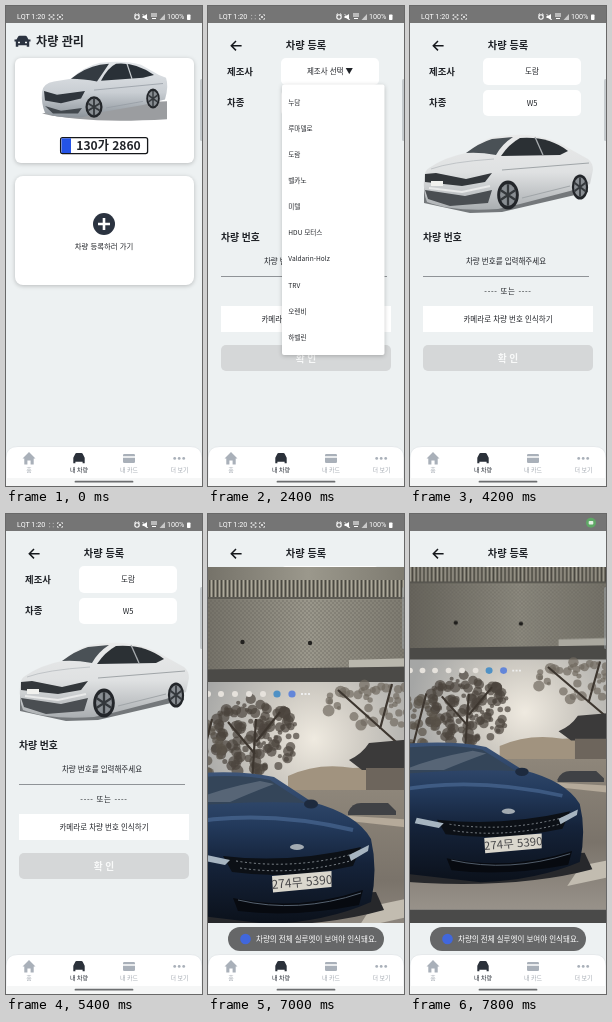
An HTML page that plays this animation: 196 px wide and 480 px high, repeating every 8 s.

```html
<!DOCTYPE html>
<html lang="ko">
<head>
<meta charset="utf-8">
<title>차량 등록</title>
<style>
html, body { margin: 0; width: 100%; height: 100%; overflow: hidden; background: #edf1f2; }
svg { display: block; width: 100vw; height: 100vh; }
text { font-family: "Noto Sans CJK KR", "Noto Sans CJK", sans-serif; fill: #202328; }
.mid { text-anchor: middle; }
.bold { font-weight: 700; }
.t75 { font-size: 7.5px; }
.status text { font-family: Roboto, sans-serif; fill: #fff; font-size: 7.2px; }
.menu text { font-size: 6.6px; }
.tabs text { font-size: 6px; fill: #a3a9b1; text-anchor: middle; }
.tabs .active { fill: #1f252e; font-weight: 500; }
.card { filter: drop-shadow(0 1.5px 2px rgba(0, 0, 0, .22)); }
.soft { filter: blur(.7px); }

.step { animation: 8s step-end infinite; }
.home { animation-name: home; }
.press { animation-name: press; }
.maker-menu { animation-name: makerMenu; }
.model-menu { animation-name: modelMenu; }
.no-maker { animation-name: noMaker; }
.maker { animation-name: maker; }
.no-model { animation-name: noModel; }
.model { animation-name: model; }
.camera { animation-name: camera; }
.toast { animation-name: toast; }
.live { animation-name: live; }
.status { animation-name: statusOut; }
.chip { animation-name: chip; }
.blink { animation: blink 1s step-end infinite; }
.view { animation: pan 8s infinite; }
.shade { animation: shade 8s infinite; }
@keyframes home { 0% { opacity: 1 } 5% { opacity: 0 } }
@keyframes press { 0% { opacity: 1 } 2.5% { opacity: .5 } }
@keyframes makerMenu { 0% { opacity: 0 } 20% { opacity: 1 } 32.5% { opacity: 0 } }
@keyframes modelMenu { 0% { opacity: 0 } 40% { opacity: 1 } 52.5% { opacity: 0 } }
@keyframes noMaker { 0% { opacity: 1 } 32.5% { opacity: 0 } }
@keyframes maker { 0% { opacity: 0 } 32.5% { opacity: 1 } }
@keyframes noModel { 0% { opacity: 1 } 52.5% { opacity: 0 } }
@keyframes model { 0% { opacity: 0 } 52.5% { opacity: 1 } }
@keyframes camera { 0% { opacity: 0 } 75% { opacity: 1 } }
@keyframes toast { 0% { opacity: 0 } 77.5% { opacity: .6 } 80% { opacity: 1 } }
@keyframes live { 0% { opacity: 0 } 85% { opacity: 1 } }
@keyframes statusOut { 0% { opacity: 1 } 95% { opacity: 0 } }
@keyframes chip { 0% { opacity: 0 } 95% { opacity: 1 } }
@keyframes blink { 0% { opacity: 1 } 40% { opacity: 0 } 80% { opacity: 1 } }
@keyframes pan {
  0%, 87.5% { transform: translate(0, 0) scale(1, 1); animation-timing-function: steps(4, end) }
  97.5%, 100% { transform: translate(12.5px, -9px) scale(.965, .92) }
}
@keyframes shade {
  0%, 87.5% { opacity: 0; animation-timing-function: steps(4, end) }
  97.5%, 100% { opacity: .08 }
}
</style>
</head>
<body>
<svg viewBox="0 0 196 480" preserveAspectRatio="none">
  <defs>
    <linearGradient id="silver" x2="0" y2="1">
      <stop stop-color="#e4e7ea"/><stop offset=".55" stop-color="#c9ced3"/><stop offset="1" stop-color="#8d949b"/>
    </linearGradient>
    <linearGradient id="pearl" x2="0" y2="1">
      <stop stop-color="#e9eaea"/><stop offset=".5" stop-color="#dfe1e2"/><stop offset="1" stop-color="#aaaeb1"/>
    </linearGradient>
    <linearGradient id="navy" x2="0" y2="1">
      <stop stop-color="#3c5478"/><stop offset=".35" stop-color="#233a5c"/><stop offset=".6" stop-color="#15233a"/><stop offset="1" stop-color="#0b111b"/>
    </linearGradient>
    <linearGradient id="monitor">
      <stop offset=".1" stop-color="#716e65"/><stop offset=".5" stop-color="#9b988c"/><stop offset=".9" stop-color="#79766c"/>
    </linearGradient>
    <radialGradient id="sky" gradientUnits="userSpaceOnUse" cx="106" cy="225" r="120">
      <stop stop-color="#efeae0"/><stop offset=".4" stop-color="#d0ccc4"/><stop offset="1" stop-color="#a5a6a5"/>
    </radialGradient>
    <linearGradient id="ground" x2="0" y2="1">
      <stop stop-color="#8e867a"/><stop offset=".55" stop-color="#7a736a"/><stop offset="1" stop-color="#98928a"/>
    </linearGradient>
    <pattern id="slats" width="4" height="17" patternUnits="userSpaceOnUse"><path d="M1.5 0V17" stroke="#4b4942" stroke-width="2"/></pattern>
    <pattern id="mesh" width="4" height="4" patternUnits="userSpaceOnUse"><path d="M0 1h2M2 3h2" stroke="#5d5b53" opacity=".6"/></pattern>
    <clipPath id="lens"><path d="M0 53H196V409H0Z"/></clipPath>
    <path id="front" d="M-6 -.5L-4 -5Q-3.6 -6 -2.5 -6H2.5Q3.6 -6 4 -5L6 -.5V5.5H3.8V4H-3.8V5.5H-6Z"/>
    <g id="focus" fill="none" stroke="#fff" stroke-width=".7"><path d="M-2.5 -1V-2.3H-1.2M1.2 -2.3H2.5V-1M2.5 1V2.3H1.2M-1.2 2.3H-2.5V1"/></g>
    <g id="wheel"><ellipse rx="9" ry="12" fill="#23262a"/><ellipse rx="6.6" ry="9.2" fill="#888d92"/><path d="M0 -9V9M-6 -4L6 4M-6 4L6 -4" stroke="#34383c" stroke-width="1.9"/></g>
  </defs>

  <path d="M0 0H196V480H0Z" fill="#edf1f2"/>

  <g id="form">
    <path d="M33.6 39.7H23.6M28 35L23.3 39.7L28 44.4" fill="none" stroke="#15181c" stroke-width="1.5"/>
    <text class="mid bold" x="98" y="43.3" font-size="10.2">차량 등록</text>
    <text class="bold" x="19" y="68.8" font-size="9.4">제조사</text>
    <text class="bold" x="19" y="100.3" font-size="9.4">차종</text>
    <rect x="73" y="52" width="98" height="27" rx="5" fill="#fff"/>
    <rect x="73" y="84" width="98" height="26" rx="5" fill="#fff"/>
    <g class="mid t75">
      <text class="step no-maker" x="122" y="68.3">제조사 선택 ▼</text>
      <text class="step maker" x="122" y="68.3">도람</text>
      <text class="step no-model" x="122" y="99.8">차종 선택 ▼</text>
      <text class="step model" x="122" y="99.8">W5</text>
      <text x="96" y="257.8">차량 번호를 입력해주세요</text>
      <text x="98" y="287.8" letter-spacing=".7">---- 또는 ----</text>
    </g>
    <g class="step model">
      <path d="M14 197L60 207L92 206L178 186V176H14Z" fill="#74787b"/>
      <path d="M14 173Q14 165 19 162Q35 151 56 147Q68 137 80 132Q98 128 118 129Q144 132 160 143L178 153Q183 157 183 164L180 178L160 185L110 198L88 203Q42 206 17 196Q13 186 14 173Z" fill="url(#pearl)"/>
      <path d="M56 147Q69 137 82 133L103 131Q92 138 86 149Q70 146 56 147Z" fill="#4a5156"/>
      <path d="M91 150Q99 138 110 132Q139 130 158 145L150 149Z" fill="#2b3034"/>
      <path d="M125 131L133 149" stroke="#a9adb0" stroke-width="1.3"/>
      <path d="M21 163Q40 156 84 153" fill="none" stroke="#c0c4c7"/>
      <path d="M15 168L26 167L56 173L82 167L75 176L52 180L15 176Z" fill="#33373b"/>
      <path d="M15 184L55 190L82 184L78 197L40 200L18 193Z" fill="#4a4e52"/>
      <path d="M19 182L52 186L80 180" fill="none" stroke="#e9eaea" stroke-width="2"/>
      <path d="M21 175H33V180H21Z" fill="#f1f1ee"/>
      <path d="M92 164L179 157M112 192L160 180" stroke="#a0a5a8"/>
      <use href="#wheel" transform="translate(98 189) scale(1.2)"/>
      <use href="#wheel" transform="translate(170 181) scale(.9 1.05)"/>
    </g>
    <text class="bold" x="13" y="234.6" font-size="9.8">차량 번호</text>
    <path d="M13 270.5H179" stroke="#85898d" stroke-width=".9"/>
    <path d="M13 300H183V326H13Z" fill="#fff"/>
    <text class="mid t75" x="98" y="315.8">카메라로 차량 번호 인식하기</text>
    <rect x="13" y="339" width="170" height="26" rx="5" fill="#d5d7d8"/>
    <text class="mid bold" x="98" y="355.7" font-size="9.7" style="fill:#f8f9f9">확 인</text>
  </g>

  <g class="step home">
    <path d="M0 17H196V441H0Z" fill="#edf1f2"/>
    <g fill="#2b3340"><use href="#front" transform="translate(16.5 35.5) scale(1.12 .95)"/><path d="M8.5 33.5H11V35.5H8.5ZM22 33.5H24.5V35.5H22Z"/></g>
    <path d="M12 36.5H14M19 36.5H21" stroke="#edf1f2" stroke-width="1.5"/>
    <text class="bold" x="30" y="39.5" font-size="12.1">차량 관리</text>
    <rect class="card" x="9" y="52" width="179" height="105" rx="6" fill="#fff"/>
    <g transform="translate(0 7) scale(1 .94)">
      <path d="M36 107Q80 118 161 113V94L80 98Z" fill="#9b9da0"/>
      <path d="M36 84Q37 75 48 73L65 70Q78 57 94 53Q119 50 135 55L153 66L160 69Q163 78 159 92L137 98L98 105L76 111Q50 112 39 106Q35 96 36 84Z" fill="url(#silver)"/>
      <path d="M65 70Q79 58 94 55L103 54L91 73Q77 70 65 70Z" fill="#343b42"/>
      <path d="M95 72Q102 58 110 54Q130 52 148 66L137 69Z" fill="#293037"/>
      <path d="M121 54L126 70" stroke="#c7ccd0" stroke-width="1.2"/>
      <path d="M38 83L51 87L79 83L75 91L55 96L39 93Z" fill="#2f353c"/>
      <path d="M39 99L55 104L76 101L72 107L47 107Z" fill="#42484e"/>
      <path d="M88 82L157 75M100 101L137 94" stroke="#959ca3" stroke-width=".8"/>
      <use href="#wheel" transform="translate(88 100) scale(.95)"/>
      <use href="#wheel" transform="translate(147 91) scale(.75 .88)"/>
    </g>
    <rect x="54.6" y="131.6" width="87" height="16" rx="2" fill="#fff" stroke="#15171a" stroke-width="1.3"/>
    <path d="M55.5 132.3H65V147H55.5Z" fill="#2453e6"/>
    <text class="mid bold" x="102.5" y="144" font-size="12.1">130가 2860</text>
    <g class="step press">
      <rect class="card" x="9" y="170" width="179" height="109" rx="8" fill="#fff"/>
      <circle cx="98" cy="218" r="11" fill="#2b3340"/>
      <path d="M92 218H104M98 212V224" stroke="#fff" stroke-width="2.6"/>
      <text class="mid" x="98" y="243" font-size="7.4">차량 등록하러 가기</text>
    </g>
  </g>

  <g class="step camera" clip-path="url(#lens)">
    <path d="M0 53H196V409H0Z"/>
    <g class="step live"><g class="view">
      <path d="M-40 20H240V168H-40Z" fill="url(#monitor)"/>
      <path d="M-40 66H240V83H-40Z" fill="#aeaa9c"/>
      <path d="M-40 66H240V83H-40Z" fill="url(#slats)"/>
      <path d="M-40 84H240" stroke="#5d5b54" stroke-width="2"/>
      <path d="M-40 86H240V156H-40Z" fill="url(#mesh)"/>
      <circle cx="34.5" cy="128" r="2.2" fill="#22211f"/><circle cx="102" cy="129" r="2.2" fill="#22211f"/>
      <path d="M141 146L240 143V152L141 154Z" fill="#b9b7ad"/>
      <path class="shade" d="M-40 20H240V168H-40Z"/>
      <path d="M-40 156L240 152V170H-40Z" fill="#4b4a47"/>
      <path d="M-40 168H240V480H-40Z" fill="url(#sky)"/>
      <g class="soft">
        <g id="trees"></g>
        <path d="M44 270L48 205M47 240L20 208M48 228L72 198M-10 262L4 205M196 235L130 176M172 215L184 170" fill="none" stroke="#3d362f" stroke-width="2.2"/>
        <path d="M80 262Q110 248 145 254L240 250V292H80Z" fill="#a1937f"/>
        <path d="M141 246Q154 240 161 229L240 222V256H154Z" fill="#3b3a3a"/>
        <path d="M158 254H240V276H158Z" fill="#6d655c"/>
        <path d="M-40 276H240V440H-40Z" fill="url(#ground)"/>
        <path d="M140 298Q144 289 153 289H180L188 297V301H140Z" fill="#3f4145"/>
        <path d="M110 300L240 308V318L150 308Z" fill="#b5aa9a"/>
        <path d="M164 392L240 376V394L150 414Z" fill="#c2bcb0"/>
        <path d="M-40 388L168 378L176 396Q90 420 -40 408Z" fill="#27282b"/>
        <path d="M-40 262Q25 254 66 263L104 288Q149 300 163 325Q170 355 163 388Q118 408 60 410L-40 398Z" fill="url(#navy)"/>
        <path d="M-40 266Q28 258 62 266L97 289Q42 286 -40 294Z" fill="#344559"/>
        <path d="M-20 288Q10 275 52 267L66 270Q40 280 22 288Z" fill="#6e7c8b" opacity=".6"/>
        <ellipse cx="103" cy="290" rx="7" ry="4.5" fill="#1d2a3e"/>
        <path d="M-30 311Q50 294 145 316" fill="none" stroke="#587ba8" stroke-width="4" opacity=".5"/>
        <path d="M15 342Q82 350 153 333L145 352Q82 366 24 358Z" fill="#0c1016"/>
        <path d="M28 347Q85 356 145 340M32 354Q85 362 142 347" fill="none" stroke="#858c92" stroke-dasharray="2 2.5"/>
        <path d="M-6 340L22 346L17 351L-8 346ZM141 341L161 331L160 337L143 347Z" fill="#a7b5c1"/>
        <path d="M25 384Q90 398 155 376L151 391Q86 404 30 397Z" fill="#070a10"/>
        <path d="M30 386Q90 400 153 379" fill="none" stroke="#55616f"/>
        <ellipse cx="89" cy="333" rx="7" ry="3" fill="#a3abb2"/>
        <path d="M-40 440H240V480H-40Z" fill="#4a4a49"/>
      </g>
      <path d="M64 362L123.5 357V373L65 378.5Z" fill="#dad7cd"/>
      <text class="mid" x="94" y="372.3" font-size="12" transform="rotate(-5 94 368)" style="fill:#48484a">274무 5390</text>
      <g fill="#e6e2dc"><circle cx="-13" cy="180" r="3"/><circle cy="180" r="3"/><circle cx="13" cy="180" r="3"/><circle cx="27" cy="180" r="3"/><circle cx="41" cy="180" r="3"/><circle cx="55" cy="180" r="3"/></g>
      <circle cx="69" cy="180" r="3.6" fill="#4f91c5"/><circle cx="84" cy="180" r="3.6" fill="#6386d9"/>
      <path d="M93 180H102" stroke="#eee" stroke-width="2" stroke-dasharray="2 1.5"/>
    </g></g>
  </g>

  <g class="tabs">
    <path d="M0 480V452Q0 440.5 12 440.5H184Q196 440.5 196 452V480Z" fill="#fff" stroke="#dfe3e6" stroke-width=".7"/>
    <path d="M0 472H196V480H0Z" fill="#f5f6f6"/>
    <g fill="#a9b0b9">
      <path d="M16.5 452.5L23 446L29.5 452.5H27.7V458.5H24.6V454.5H21.4V458.5H18.3V452.5Z"/>
      <rect x="117" y="448" width="12" height="9" rx="1.2"/>
      <circle cx="168.7" cy="452.4" r="1.4"/><circle cx="173.2" cy="452.4" r="1.4"/><circle cx="177.7" cy="452.4" r="1.4"/>
    </g>
    <path d="M117 451H129" stroke="#fff" stroke-width="1.5"/>
    <use href="#front" transform="translate(73 452.3) scale(.95 .88)" fill="#2b313a"/>
    <text x="23" y="466.2">홈</text><text class="active" x="73" y="466.2">내 차량</text>
    <text x="123" y="466.2">내 카드</text><text x="173.5" y="466.2">더 보기</text>
    <path d="M69.5 475.7H126.5" stroke="#6c6e70" stroke-width="1.8" stroke-linecap="round"/>
  </g>

  <g class="step toast">
    <rect x="20" y="413" width="156" height="24" rx="12" fill="#666768"/>
    <circle cx="37.5" cy="425" r="5.3" fill="#4167dc"/>
    <text class="t75" x="48" y="427.8" style="fill:#fff">차량의 전체 실루엣이 보여야 인식돼요.</text>
  </g>

  <path d="M0 0H196V17H0Z" fill="#757575"/>
  <g class="step status">
    <text x="11" y="13">LQT 1:20</text>
    <path d="M43.2 9.4h.9M46.8 9.4h.9M43.2 12.8h.9M46.8 12.8h.9" stroke="#ddd" stroke-width=".8"/>
    <g class="blink"><use href="#focus" x="45.5" y="11"/><path d="M44.5 10L46.5 12M46.5 10L44.5 12" stroke="#fff" stroke-width=".7"/></g>
    <use href="#focus" x="54" y="11"/><path d="M53 10L55 12M55 10L53 12" stroke="#fff" stroke-width=".7"/>
    <circle cx="131" cy="11" r="2.2" fill="none" stroke="#fff" stroke-width="1.1"/><path d="M128.3 9L130 7.6M133.7 9L132 7.6" stroke="#fff"/>
    <path d="M136.5 10H138L141 8V14L138 12H136.5Z" fill="#fff"/><path d="M136.5 8L142 14" stroke="#fff" stroke-width=".8"/>
    <path d="M145 8H151M145 10H151M146 12.5H150" stroke="#fff" stroke-width="1.1"/>
    <path d="M153.5 14L159 8V14Z" fill="#c9c9c9"/>
    <text x="161" y="13">100%</text>
    <rect x="181" y="8.5" width="3.5" height="5.5" rx=".7" fill="#fff"/>
  </g>
  <g class="step chip"><circle cx="181" cy="8.7" r="5" fill="#5fa866"/><rect x="178.7" y="7" width="4.6" height="3.6" rx=".8" fill="#e4efe4"/></g>
  <g id="menus"></g>
  <rect x="194" y="73" width="4" height="62" rx="1.5" fill="#a0a5aa" opacity=".5"/>
</svg>
<script>
const makers = ['누담', '루마델로', '도람', '벨카노', '미텔', 'HDU 모터스', 'Valdarin-Holz', 'TRV', '오렌비', '하벨린'];
const models = ['도르반', 'QL3', 'QL6', 'QL9', 'W5', 'W8', 'W9', '누벨라', '달온', '페온', '페온QL', '루단', '바렌코', '미르델', '하르나트'];

const menu = (name, items, top, height, gap) => `
  <g class="step menu ${name}">
    <rect class="card" x="74" y="${top}" width="102.5" height="${height}" rx="2" fill="#fff"/>
    ${items.map((item, i) => `<text x="80.3" y="${top + 20.3 + i * gap}">${item}</text>`).join('')}
  </g>`;

// Leaves scattered evenly over an ellipse.
let seed = 7;
const random = () => (seed = seed * 16807 % 2147483647) / 2147483647;
const foliage = (count, cx, cy, rx, ry, color) => Array.from({ length: count }, () => {
  const angle = random() * 2 * Math.PI;
  const reach = Math.sqrt(random());
  const x = cx + rx * reach * Math.cos(angle);
  const y = cy + ry * reach * Math.sin(angle);
  return `<circle cx="${x.toFixed(1)}" cy="${y.toFixed(1)}" r="${(2 + 4 * random()).toFixed(1)}" fill="${color}" opacity=".7"/>`;
}).join('');

document.getElementById('trees').innerHTML =
  foliage(130, 46, 222, 44, 38, '#4c453d') +
  foliage(45, -12, 235, 28, 30, '#5a5349') +
  foliage(55, 172, 192, 58, 22, '#716a60');
document.getElementById('menus').innerHTML =
  menu('maker-menu', makers, 78.5, 270.5, 26.1) +
  menu('model-menu', models, 27, 395, 25.75);
</script>
</body>
</html>
```
